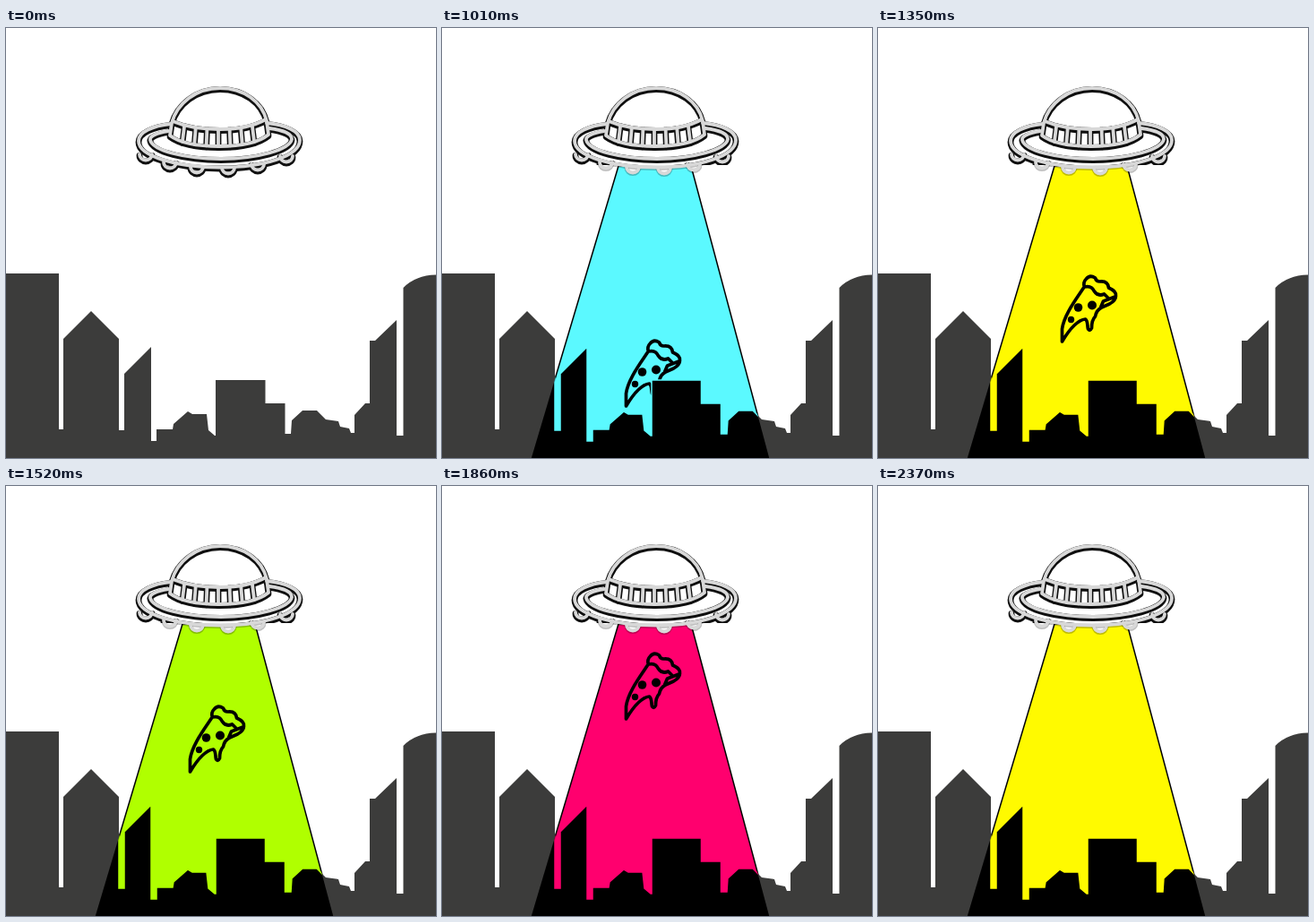
These frames come from a looping animation (480 by 480 pixels, 2540 ms). An HTML page:

```html
<!DOCTYPE html>
<html lang="en">
<head>
<meta charset="utf-8">
<title>Pizza abduction</title>
<style>
  html, body { margin: 0; width: 100%; height: 100%; overflow: hidden; background: #fff; }
  svg { display: block; width: 100vw; height: 100vh; }
  .line { fill: none; stroke-linecap: round; stroke-linejoin: round; }
</style>
</head>
<body>
<svg viewBox="0 0 480 480">
  <defs>
    <path id="city" d="M0 274H59V448H64V347L95 316L126 347V449H132V386L162 356V461H168V448H186L187 442L203 428L208 431H224L226 449L233 455H234V393H289.500V419H311.500V453H318L319 438L331 427H347L357 437L371 439L373 445L383 447L385 452H389V432L401 419H406V349H412L436 326V455H443.500V290Q457 276 480 275.500V482H0Z"/>
    <path id="cone" d="M197 154L99.500 481H365.500L278 154Z"/>
    <path id="hull" d="M184 107C164 109 148 116 148 126C148 143 190 155.500 239 155.500C288 155.500 328 143 328 125C328 115 312 108 291 106"/>
    <path id="dome" d="M183 120L185 106C191 84 212 67 239 67C265 67 286 82 291 104L293 119Q277 132 238 132Q199 132 183 120Z"/>
    <g id="bumps"></g>
    <g id="ship" class="line">
      <use href="#hull"/>
      <use href="#dome"/>
      <path d="M186 104Q207 113 239 113Q270 113 290 102"/>
      <path d="M181 115C168 117 160 121 161 125C164 137 200 146 240 146C280 146 317 136 319 124C319 118 309 114 294 112"/>
      <path id="bars"/>
      <use href="#bumps"/>
    </g>
    <clipPath id="inCone"><use href="#cone"/></clipPath>
    <clipPath id="upper"><rect width="480" height="153"/></clipPath>
  </defs>

  <g id="beam">
    <use id="light" href="#cone" stroke="#000" stroke-width="1.500"/>
    <g clip-path="url(#inCone)">
      <g id="pizza" class="line" stroke="#000" stroke-width="3.700">
        <path d="M28 14C21 25 6 44 4 60L4 74C10 64 20 50 30 49C33 51 32 57 33 60Q35 63 37 59C37 54 38 49 41 46C42 41 44 38 48 36L57 32Q64 28 64 23Q65 18 56 14Q55 6 46 7Q42 7 41 3Q35 -1 31 4Q27 8 29 13Q37 11 40 18Q44 24 51 21L55 25M47 36L50 29L63 24"/>
        <g fill="#000" stroke="none">
          <circle cx="22" cy="36" r="4.800"/>
          <circle cx="37.500" cy="33.500" r="5"/>
          <circle cx="14" cy="49.500" r="3.700"/>
        </g>
      </g>
    </g>
  </g>

  <use href="#city" fill="#3c3c3b"/>
  <!-- The light eats slightly into the lit buildings. -->
  <g id="shade" clip-path="url(#inCone)" stroke-width="1.500"><use href="#city" fill="#000"/></g>

  <g fill="#fff"><use href="#bumps"/><use href="#hull"/><use href="#dome"/></g>
  <g id="shadow"><use href="#ship" y="1.500" stroke="#111" stroke-width="6.800"/></g>
  <use id="glow" href="#ship" y="1" stroke="#000" stroke-opacity=".25" stroke-width="5"/>
  <use href="#ship" stroke="#d8d8d8" stroke-width="3.800"/>
</svg>
<script>
const $ = id => document.getElementById(id);

const bumps = [[156, 141], [183, 150], [213, 155], [248, 156], [281, 152], [313, 143]];
$('bumps').innerHTML = bumps
  .map(([x, y]) => `<path d="M${x - 7} ${y}A7 6.500 0 0 0 ${x + 7} ${y}"/>`).join('');

// Window bars follow the two curved edges of the band.
let bars = '';
for (let i = -3; i <= 3; i++) {
  const d = i * 12.6, q = (d / 53) ** 2;
  bars += `M${237 + d} ${113 - 9 * q}L${237 + d * 1.06} ${132 - 10 * q}`;
}
$('bars').setAttribute('d', bars);

const yellow = '#fffa00', cyan = '#5bf9ff', pink = '#ff006e', lime = '#b0ff00';
const LOOP = 2540, START = 670, STEP = 170;

// Beam colour and top of the slice; no top means no slice.
const steps = [
  [yellow], [yellow, 374], [cyan, 348], [pink, 308], [yellow, 276], [lime, 245],
  [yellow, 215], [pink, 186], [cyan, 152], [yellow, 118], [yellow]
];

const show = (id, on) => $(id).setAttribute('visibility', on ? 'visible' : 'hidden');

function draw(now) {
  const t = now % LOOP;
  const on = t >= START;
  for (const id of ['beam', 'shade', 'glow']) show(id, on);
  if (on) $('shadow').setAttribute('clip-path', 'url(#upper)');
  else $('shadow').removeAttribute('clip-path');

  const [color, y] = on ? steps[Math.floor((t - START) / STEP)] : steps[0];
  $('light').setAttribute('fill', color);
  $('shade').setAttribute('stroke', color);
  $('pizza').setAttribute('display', on && y ? 'inline' : 'none');
  if (y) $('pizza').setAttribute('transform', `translate(201.500 ${y})`);
}

const begin = performance.now();
function tick() {
  draw(performance.now() - begin);
  requestAnimationFrame(tick);
}
tick();
</script>
</body>
</html>
```
